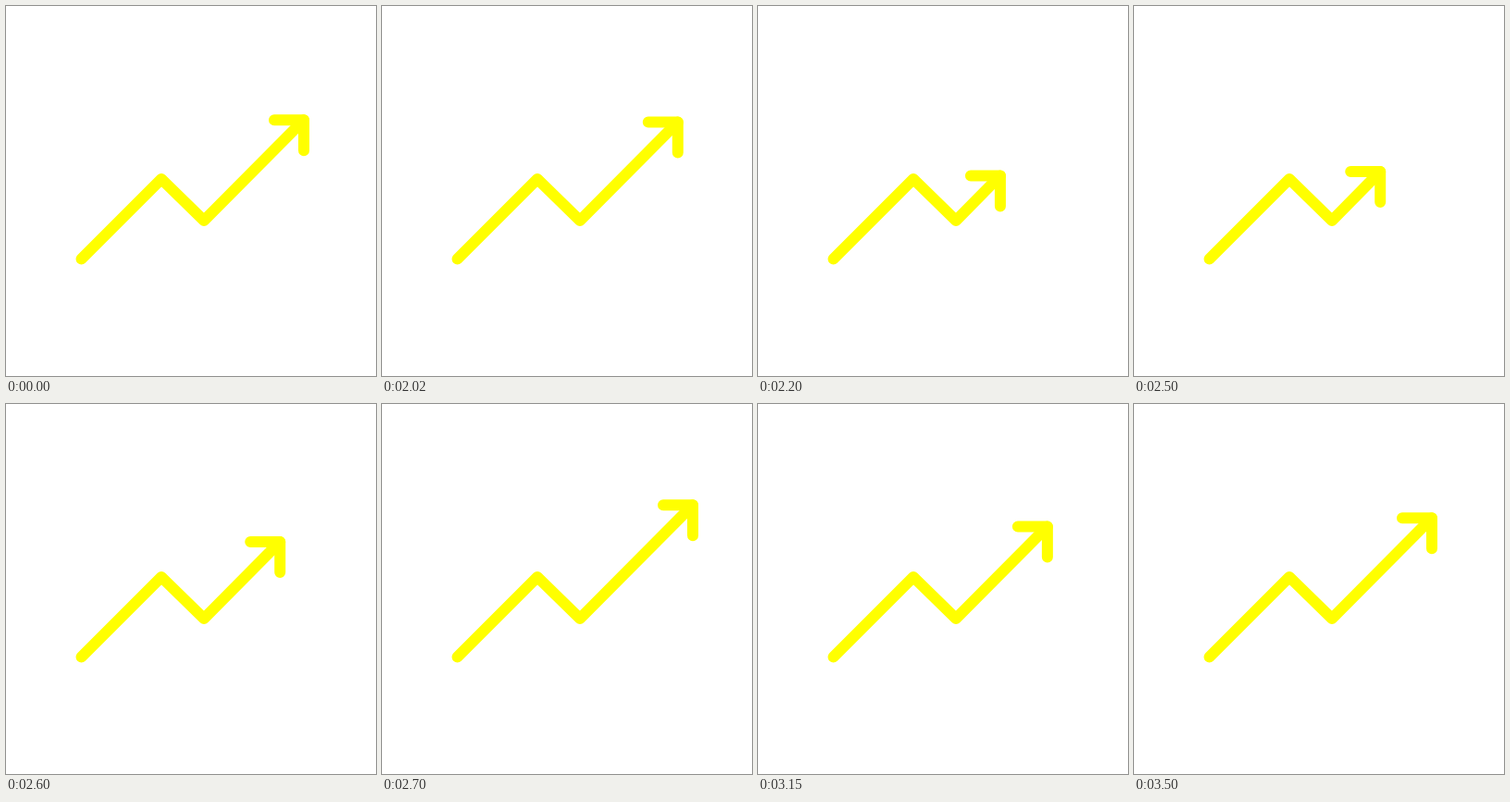
Animation, 400 px wide and 400 px high, one loop 3520 ms. Source, as an HTML page:

```html
<!DOCTYPE html>
<html lang="en">
<head>
<meta charset="utf-8">
<title>Rising arrow</title>
<style>
  html, body { margin: 0; width: 100%; height: 100%; overflow: hidden; background: #fff; }
  svg { display: block; width: 100%; height: 100%; }
  path { fill: none; stroke: #ff0; stroke-width: 12; stroke-linecap: round; stroke-linejoin: round; }
</style>
</head>
<body>
<svg viewBox="0 0 400 400">
  <path id="line"/>
  <path id="head" d="M-32 0H0V33"/>
</svg>
<script>
const LOOP = 3520;
const line = document.getElementById('line');
const head = document.getElementById('head');

// Tip moves along the diagonal: start, end, from x, to x, easing handles
const moves = [
  [2000, 2340, 322, 257, 0.23, 0],
  [2340, 2780, 257, 341, 0.79, 0.49],
  [2780, 3230, 341, 311, 0.42, 0.58],
  [3230, 3500, 311, 322, 0.42, 0.58]
];

// Cubic Bezier easing with handles (a, 0) and (b, 1)
function ease(x, a, b) {
  let low = 0, high = 1;
  for (let i = 0; i < 24; i++) {
    const s = (low + high) / 2, r = 1 - s;
    if (3 * r * r * s * a + 3 * r * s * s * b + s * s * s < x) low = s;
    else high = s;
  }
  return low * low * (3 - 2 * low);
}

function tipX(time) {
  const move = moves.find(([start, end]) => time >= start && time < end);
  if (!move) return 322;
  const [start, end, from, to, a, b] = move;
  return from + (to - from) * ease((time - start) / (end - start), a, b);
}

function draw(now) {
  const x = tipX(now % LOOP), y = 445.3 - x;
  line.setAttribute('d', `M81.5 273.5L168 187L214 232L${x} ${y}`);
  head.setAttribute('transform', `translate(${x} ${y})`);
  requestAnimationFrame(draw);
}
draw(0);
</script>
</body>
</html>
```
